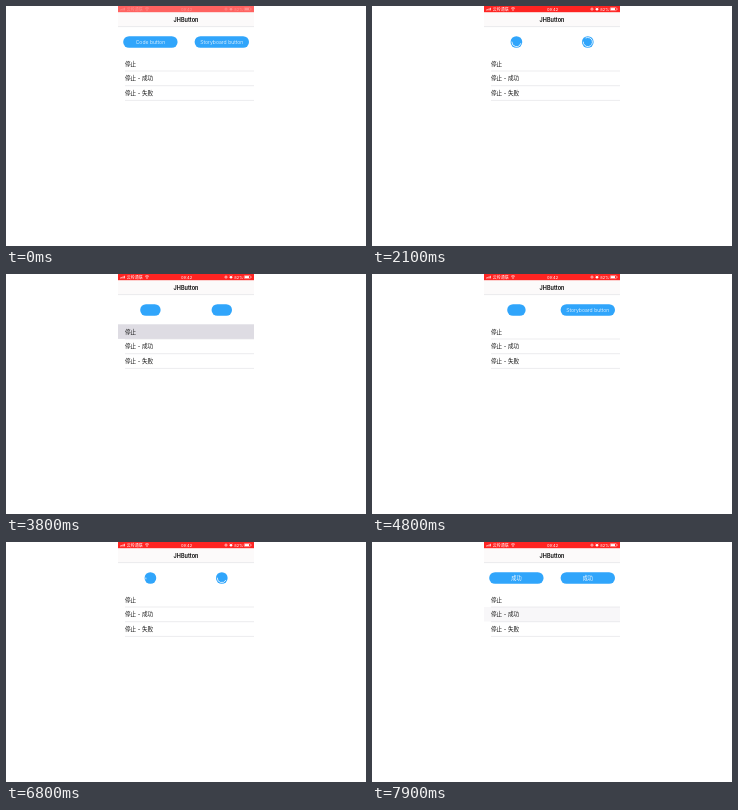
Write an HTML page that moves like this. It is 360x240 px and loops after 8 s.

```html
<!DOCTYPE html>
<html lang="zh">
<head>
<meta charset="utf-8">
<title>Loading buttons</title>
<style>
  html, body { margin: 0; width: 100%; height: 100%; overflow: hidden; background: #fff; }
  svg { display: block; width: 360px; height: 240px; }
  text { font-family: Inter, "Noto Sans CJK SC", "Noto Sans CJK", sans-serif; dominant-baseline: central; }
  .mid { text-anchor: middle; }
  .row { font-size: 5.6px; fill: #111; }
  .label { font-size: 5.15px; font-weight: 300; fill: #fff; text-anchor: middle; }
  .status { font-size: 4px; fill: #fff; }
  .line { stroke: #d9d9dd; stroke-width: .5; }
  .ring { fill: none; stroke: #fff; stroke-width: .8; stroke-linecap: round; }
</style>
</head>
<body>
<svg viewBox="0 0 360 240">
  <rect x="112" width="136" height="20.5" y="0" fill="#fcfafa"/>
  <rect id="bar" x="112" width="136" height="6.2" fill="#fe2422"/>
  <g id="marks" class="status">
    <path d="M114.5 4.4v-.8M115.8 4.4v-1.4M117.1 4.4v-2M118.4 4.4v-2.6" stroke="#fff" stroke-width=".8"/>
    <text x="120.8" y="3.1">云岭通联</text>
    <path d="M139 2.4q2-1.7 4 0M139.9 3.3q1.1-.9 2.2 0" fill="none" stroke="#fff" stroke-width=".6"/>
    <circle cx="141" cy="4.2" r=".5" fill="#fff"/>
    <text class="mid" x="180.5" y="3.1">09:42</text>
    <circle cx="220" cy="3.1" r="1.1" fill="none" stroke="#fff" stroke-width=".6"/>
    <circle cx="220" cy="3.1" r=".4"/>
    <circle cx="225" cy="3.2" r="1.3"/>
    <path d="M223.5 1.8l.7-.5M226.5 1.8l-.7-.5" stroke="#fff" stroke-width=".5"/>
    <text x="228.3" y="3.1">82%</text>
    <rect x="238.2" y="1.6" width="6.2" height="3" rx=".6" fill="none" stroke="#fff" stroke-width=".4"/>
    <rect x="238.7" y="2.1" width="4.3" height="2"/>
    <rect x="244.9" y="2.5" width=".5" height="1.2"/>
  </g>
  <text class="mid" x="180" y="13.7" font-size="5.5" font-weight="600">JHButton</text>
  <path class="line" d="M112 20.6H248"/>
  <g id="rows"></g>
  <g id="buttons"></g>
</svg>
<script>
const LOOP = 8000, FULL = 54.4, DOT = 11.7, CY = 36;
const SHRINK = 120, GROW = 200, SWEEP = 900;
const $ = id => document.getElementById(id);
const clamp = v => Math.min(1, Math.max(0, v));
const ease = v => .5 - .5 * Math.cos(Math.PI * clamp(v));

function add(parent, tag, attrs, content = '') {
  const el = document.createElementNS('http://www.w3.org/2000/svg', tag);
  for (const key in attrs) el.setAttribute(key, attrs[key]);
  el.textContent = content;
  return parent.appendChild(el);
}

// tap: time at which the row lights up; fade: how long it takes to clear
const rows = [
  { text: '停止', tap: 3680, fade: 400 },
  { text: '停止 - 成功', tap: 7480, fade: 400 },
  { text: '停止 - 失败' }
].map((row, i) => {
  const top = 50.3 + i * 14.7;
  const glow = add($('rows'), 'rect', { x: 112, y: top, width: 136, height: 14.6, fill: '#d6d3dc' });
  add($('rows'), 'text', { class: 'row', x: 119, y: top + 7.4 }, row.text);
  add($('rows'), 'path', { class: 'line', d: `M119 ${top + 14.7}H248` });
  return { ...row, glow };
});

// Each run: shrink start, ring start, stop, label after stopping
const buttons = [
  { x: 144.4, title: 'Code button',
    runs: [[520, 720, 3760], [4700, 4900, 7560, '成功']] },
  { x: 215.8, title: 'Storyboard button',
    runs: [[760, 950, 3760], [5200, 5400, 7560, '成功']] }
].map(b => ({
  ...b,
  pill: add($('buttons'), 'rect', { y: CY - DOT / 2, height: DOT, rx: DOT / 2, fill: '#30a5fb' }),
  ring: add($('buttons'), 'path', { class: 'ring' }),
  label: add($('buttons'), 'text', { class: 'label', x: b.x, y: CY + .2 })
}));

// Counter-clockwise arc that starts at the left edge
function arc(cx, part) {
  if (part < .005) return '';
  const r = 4.6, a = Math.PI - 2 * Math.PI * Math.min(part, .998);
  const x = cx + r * Math.cos(a), y = CY + r * Math.sin(a);
  return `M${cx - r} ${CY}A${r} ${r} 0 ${part > .5 ? 1 : 0} 0 ${x} ${y}`;
}

function drawButton(b, t) {
  let open = 1, part = 0, label = b.title;
  for (const [shrink, spin, stop, done] of b.runs) {
    if (t <= shrink) break;
    if (t < stop) {
      open = 1 - clamp((t - shrink) / SHRINK);
      const k = t < spin ? 0 : (t - spin) % (2 * SWEEP) / SWEEP;
      part = ease(k < 1 ? k : 2 - k);
    } else {
      open = clamp((t - stop) / GROW);
      part = 0;
      label = done || b.title;
    }
  }
  const w = DOT + (FULL - DOT) * open;
  b.pill.setAttribute('x', b.x - w / 2);
  b.pill.setAttribute('width', w);
  b.ring.setAttribute('d', arc(b.x, part));
  b.label.textContent = open === 1 ? label : '';
}

function draw(t) {
  const early = t < 100;
  $('bar').setAttribute('fill', early ? '#ff6260' : '#fe2422');
  $('marks').setAttribute('opacity', early ? .3 : 1);
  for (const { glow, tap, fade } of rows) {
    const lit = t >= tap && t < tap + 520;
    glow.setAttribute('opacity', lit ? 1 - .82 * clamp((t - tap - 20) / fade) : 0);
  }
  buttons.forEach(b => drawButton(b, t));
}

const begin = performance.now();
function tick() {
  draw((performance.now() - begin) % LOOP);
  requestAnimationFrame(tick);
}
tick();
</script>
</body>
</html>
```
